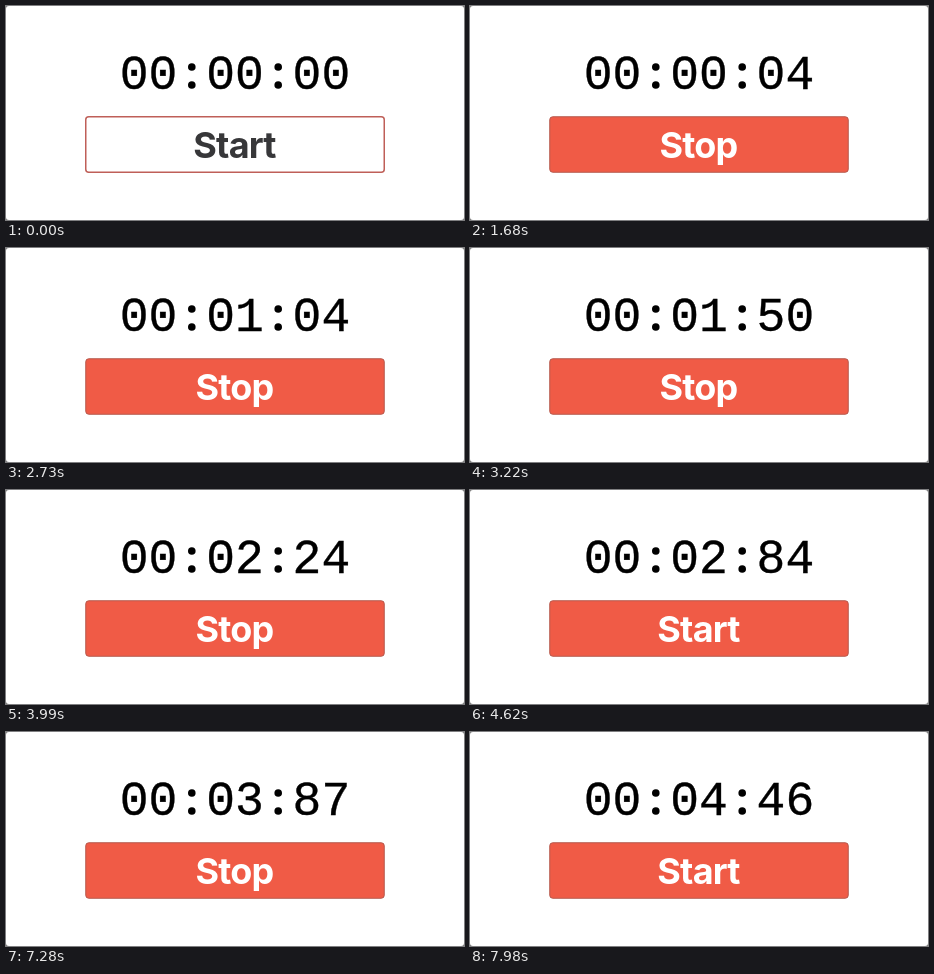
An HTML page that plays this animation: 458x214 px, repeating every 8 s.

```html
<!DOCTYPE html>
<html lang="en">
<head>
<meta charset="utf-8">
<title>Stopwatch</title>
<style>
  html, body { margin: 0; width: 100%; height: 100%; overflow: hidden; background: #fff; }
  svg { display: block; width: 458px; height: 214px; }
  .digit { font: 48px "Liberation Mono", monospace; text-anchor: middle; fill: #000; stroke: #000; stroke-width: .35; }
  .label { font: 700 36px Inter, sans-serif; letter-spacing: -.8px; text-anchor: middle; }
</style>
</head>
<body>
<svg viewBox="0 0 458 214">
  <rect width="458" height="214" fill="#777"/>
  <rect width="458" height="214" rx="3" fill="#fff"/>
  <g id="clock"></g>
  <rect id="button" x="79.75" y="110.75" width="298.5" height="55.5" rx="3"/>
  <text id="label" class="label" x="228.5" y="152"></text>
</svg>
<script>
const LOOP = 8000, STEP = 70, RATE = 20 / 3;
const START = 24, PAUSE = 66, RESUME = 89, END = 113;
const NS = "http://www.w3.org/2000/svg";
const clock = document.getElementById("clock");
const button = document.getElementById("button");
const label = document.getElementById("label");

function add(tag, attrs) {
  const el = document.createElementNS(NS, tag);
  for (const key in attrs) el.setAttribute(key, attrs[key]);
  return clock.appendChild(el);
}

const digits = [];
for (let i = 0; i < 8; i++) {
  const x = 128.2 + 28.8 * i;
  if (i % 3 === 2) {
    for (const cy of [61, 79]) add("circle", { cx: x, cy, r: 3.8 });
  } else {
    digits.push(add("text", { class: "digit", x, y: 82.5 }));
  }
}

// Elapsed hundredths of a second at a given display tick
function elapsed(tick) {
  if (tick < START) return 0;
  if (tick < RESUME) return Math.floor(50.7 + (Math.min(tick, PAUSE) - 31) * RATE);
  return Math.min(446, Math.floor(287.4 + (tick - RESUME) * RATE));
}

const pad = n => String(n).padStart(2, "0");

function draw(time) {
  const tick = Math.floor((time % LOOP) / STEP);
  const cs = elapsed(tick);
  const text = pad(Math.floor(cs / 6000)) + pad(Math.floor(cs / 100) % 60) + pad(cs % 100);
  digits.forEach((el, i) => { el.textContent = text[i]; });

  const hot = tick >= START;
  const running = (hot && tick < PAUSE) || (tick >= RESUME && tick < END);
  button.setAttribute("fill", hot ? "#f05b46" : "#fff");
  button.setAttribute("stroke", hot ? "#b5584c" : "#bf5f58");
  button.setAttribute("stroke-width", hot ? 1 : 1.5);
  label.setAttribute("fill", hot ? "#fff" : "#373739");
  label.textContent = running ? "Stop" : "Start";
}

const origin = performance.now();
function loop() {
  draw(performance.now() - origin);
  requestAnimationFrame(loop);
}
loop();
</script>
</body>
</html>
```
